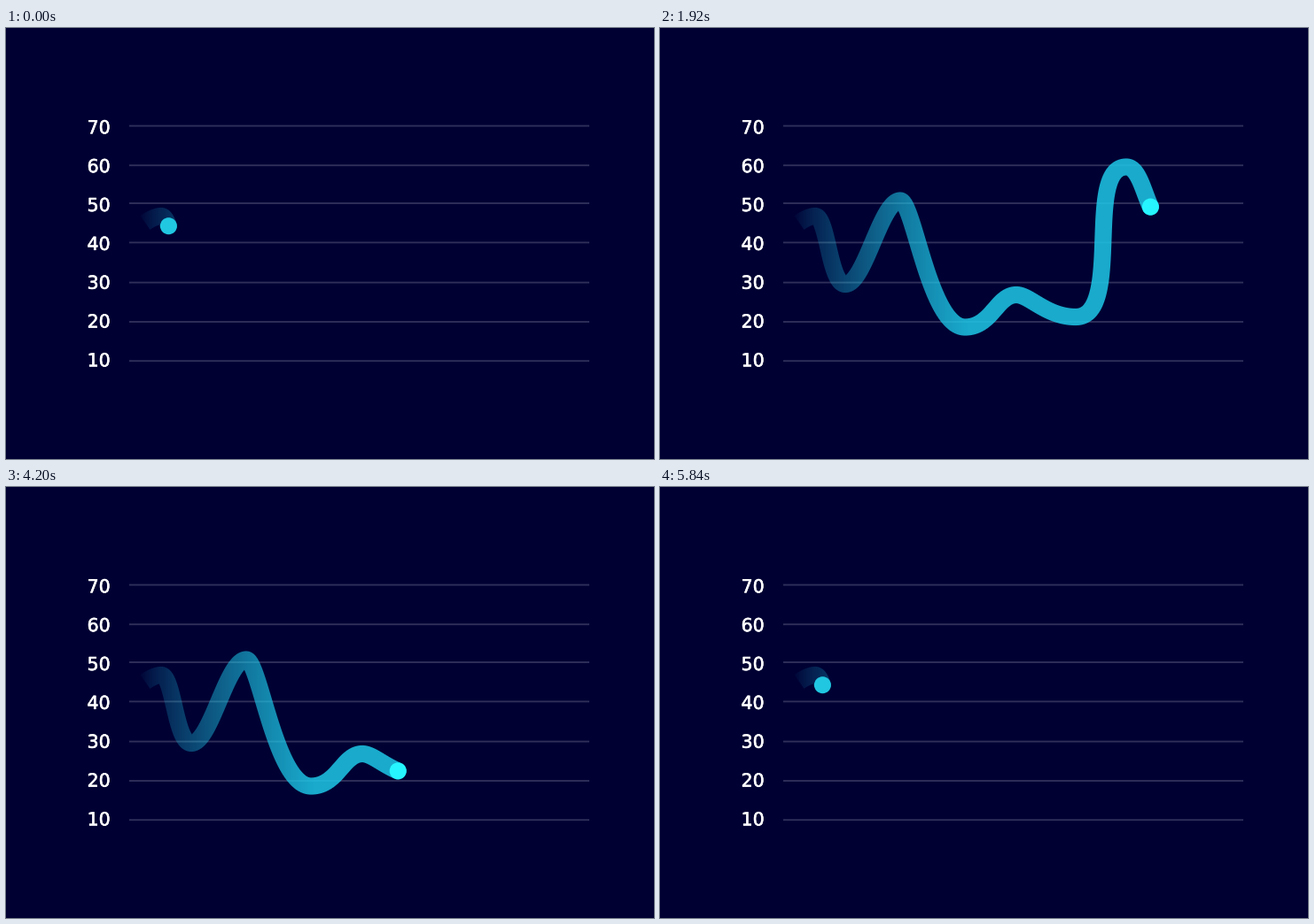
Recreate the animation shown at these times as a matplotlib script. Size 731 by 487 pixels, loop 6960 ms.

```python
import numpy as np
import matplotlib.pyplot as plt
from matplotlib.animation import FuncAnimation
from matplotlib.patches import Circle
from matplotlib.patheffects import withStroke

W, H, DPI = 731, 487, 100
PX = 72 / DPI
STEP, FRAMES = 40, 174
OUT_END, BACK_START, BACK_END = 2560, 3640, 5840
BG = "#000033"
TRAIL = np.array([30, 202, 233]) / 255
DOT_REST = np.array([33, 199, 225]) / 255
DOT_MOVE = np.array([38, 245, 255]) / 255
HALF = 9.6  # half the trail's width

# Turning points: x, y and the reach of the level handles to left and right.
TURNS = [
    (157, 220, 0, 0), (175, 212.5, 8, 14), (209, 289.5, 18, 22),
    (271, 195, 22, 15), (344, 338, 40, 30), (402, 301.5, 22, 15),
    (469, 326.5, 33, 54), (526, 157, 48, 21), (572, 220, 24, 16),
    (616, 198, 22, 12), (644.3, 203, 0, 0),
]


def build_path():
    u = np.linspace(0, 1, 80)[:, None]
    parts = []
    for (x0, y0, _, right), (x1, y1, left, _) in zip(TURNS, TURNS[1:]):
        a, b = np.array([x0, y0]), np.array([x1, y1])
        parts.append((1 - u) ** 3 * a + 3 * (1 - u) ** 2 * u * (a + [right, 0])
                     + 3 * (1 - u) * u ** 2 * (b - [left, 0]) + u ** 3 * b)
    pts = np.vstack(parts)
    return pts, np.r_[0, np.cumsum(np.hypot(*np.diff(pts, axis=0).T))]


PTS, DIST = build_path()
S_REST = DIST[np.argmin(np.hypot(*(PTS - [184, 224]).T))]
S_END = DIST[-1]


def at(s):
    return np.array([np.interp(s, DIST, PTS[:, 0]), np.interp(s, DIST, PTS[:, 1])])


def ease_out(u):
    return 0.672 * (1 - u) ** 2 * u + 3 * (1 - u) * u ** 2 + u ** 3


def ease_back(u):
    return 1 - (1 - u ** 1.4) ** 3.73


def travel(time):
    if time < BACK_START:
        p = ease_out(min(time / OUT_END, 1))
    else:
        p = 1 - ease_back(min((time - BACK_START) / (BACK_END - BACK_START), 1))
    return S_REST + (S_END - S_REST) * p


# Trail layer: coverage of the stroke times a left-to-right fade.
X0, X1, Y0, Y1 = 140, 664, 140, 356
gy, gx = np.mgrid[Y0:Y1, X0:X1] + 0.5
FADE = 0.85 * np.clip((gx - 150) / 198, 0, 1) ** 0.75

# Cut the trail's first end off square.
aim = at(2) - at(0)
aim /= np.hypot(*aim)
ahead = (gx - TURNS[0][0]) * aim[0] + (gy - TURNS[0][1]) * aim[1]
FADE *= np.where(gy < 235, np.clip(ahead + 0.5, 0, 1), 1)


def trail_alpha(s):
    gap2 = np.full(gx.shape, 1e4)
    r = 12
    for x, y in (at(d) for d in np.r_[np.arange(0, s, 1.0), s]):
        i, j = int(y) - Y0, int(x) - X0
        win = np.s_[i - r:i + r + 1, j - r:j + r + 1]
        np.minimum(gap2[win], (gx[win] - x) ** 2 + (gy[win] - y) ** 2, out=gap2[win])
    return FADE * np.clip(HALF + 0.5 - np.sqrt(gap2), 0, 1)


fig = plt.figure(figsize=(W / DPI, H / DPI), dpi=DPI, facecolor=BG)
ax = fig.add_axes([0, 0, 1, 1])
ax.axis("off")

bold = [withStroke(linewidth=0.55 * PX, foreground="white")]
for n, y in enumerate([110.6, 155.2, 198, 242.4, 287.6, 332, 376.2]):
    ax.plot([139, 658], [y, y], color="#2f2f5a", lw=1.9 * PX,
            solid_capstyle="butt", snap=False, zorder=1)
    ax.text(117.8, 119.3 + 43.85 * n, str(70 - 10 * n), color="white",
            family="DejaVu Sans", size=20.6 * PX, ha="right", va="baseline",
            path_effects=bold)

rgba = np.zeros(gx.shape + (4,))
rgba[..., :3] = TRAIL
trail = ax.imshow(rgba, extent=(X0, X1, Y1, Y0), interpolation="nearest",
                  aspect="auto", zorder=2)
dot = ax.add_patch(Circle((184, 224), 9.5, lw=0, zorder=3))
ax.set_xlim(0, W)
ax.set_ylim(H, 0)


def draw(frame):
    time = frame * STEP
    s = travel(time)
    rgba[..., 3] = trail_alpha(s)
    trail.set_data(rgba)
    dot.center = tuple(at(s))
    glow = np.clip(min(time, BACK_END - time) / 240, 0, 1)
    dot.set_facecolor(DOT_REST + (DOT_MOVE - DOT_REST) * glow)
    return trail, dot


anim = FuncAnimation(fig, draw, frames=FRAMES, interval=STEP, repeat=True,
                     repeat_delay=0, init_func=lambda: draw(0))
plt.show()
```
